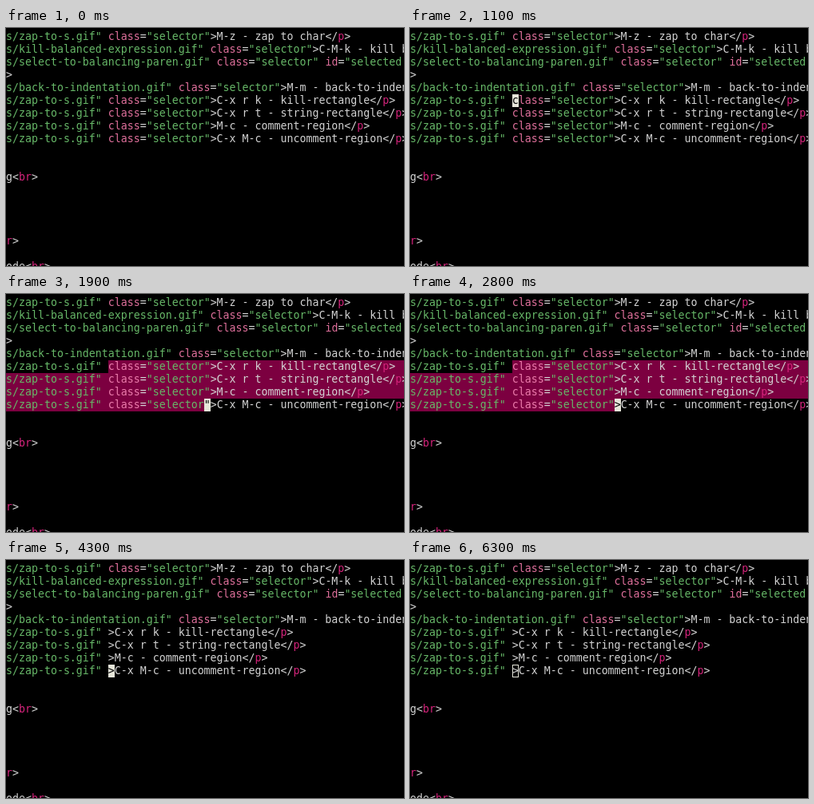
These frames come from a looping animation (498 px wide and 298 px high, 6.4 s). An HTML page:

```html
<!DOCTYPE html>
<html lang="en">
<head>
<meta charset="utf-8">
<title>Kill rectangle</title>
<style>
  html, body { margin: 0; width: 100%; height: 100%; overflow: hidden; background: #000; }
  #editor {
    position: absolute; left: 0; top: 3px; width: 498px; height: 295px; overflow: hidden;
    font: 13.288px/16px "DejaVu Sans Mono", monospace; color: #d3d3d3;
    font-variant-ligatures: none;
  }
  .row { height: 16px; white-space: pre; }
  .row span { display: inline-block; height: 16px; vertical-align: top; }
  .str { color: #67b868; }
  .attr { color: #e0709c; }
  .tag { color: #d6247c; }
  .sel { background: #7c0040; }
  .sel.attr { color: #ec7cac; }
  .row .box { background: #e6e6da; color: #000; }
  .hollow { box-shadow: inset 0 0 0 1px #e6e6da; }
</style>
</head>
<body>
<div id="editor"></div>
<script>
const LOOP = 6400, COLS = 63, TOP = 5, BOTTOM = 8, MARK = 16, END = 32;
const ATTR = 'class="selector"';

const lines = [
  `s/zap-to-s.gif" ${ATTR}>M-z - zap to char</p>`,
  `s/kill-balanced-expression.gif" ${ATTR}>C-M-k - kill balanced`,
  `s/select-to-balancing-paren.gif" ${ATTR} id="selected`,
  '>',
  `s/back-to-indentation.gif" ${ATTR}>M-m - back-to-indentation`,
  `s/zap-to-s.gif" ${ATTR}>C-x r k - kill-rectangle</p>`,
  `s/zap-to-s.gif" ${ATTR}>C-x r t - string-rectangle</p>`,
  `s/zap-to-s.gif" ${ATTR}>M-c - comment-region</p>`,
  `s/zap-to-s.gif" ${ATTR}>C-x M-c - uncomment-region</p>`,
  '', '', 'g<br>', '', '', '', '', 'r>', '', 'ode<br>'
];

// Each step holds until the next: start time, cursor row and column, cursor style, mode.
const steps = [
  { at: 0, row: 5, col: MARK, cursor: '' },
  { at: 600, row: 5, col: MARK, cursor: 'box' },
  { at: 1300, row: 6, col: MARK, cursor: 'box', mode: 'select' },
  { at: 1400, row: 7, col: MARK, cursor: 'box', mode: 'select' },
  { at: 1500, row: 8, col: MARK, cursor: 'box', mode: 'select' },
  { at: 1700, row: 8, col: 21, cursor: 'box', mode: 'select' },
  { at: 1800, row: 8, col: 31, cursor: 'box', mode: 'select' },
  { at: 2400, row: 8, col: END, cursor: 'box', mode: 'select' },
  { at: 2900, row: 8, col: END, cursor: '', mode: 'select' },
  { at: 3400, row: 8, col: END, cursor: 'box', mode: 'select' },
  { at: 4100, row: 8, col: MARK, cursor: 'box', mode: 'killed' },
  { at: 4600, row: 8, col: MARK, cursor: '', mode: 'killed' },
  { at: 5100, row: 8, col: MARK, cursor: 'box', mode: 'killed' },
  { at: 5600, row: 8, col: MARK, cursor: '', mode: 'killed' },
  { at: 6100, row: 8, col: MARK, cursor: 'box', mode: 'killed' },
  { at: 6200, row: 8, col: MARK, cursor: 'hollow', mode: 'killed' }
];

const syntax = [
  ['str', /^s\/[^"]*"|"[^"]*("|$)/g],
  ['attr', /\b(class|id)(?==)/g],
  ['tag', /(?<=<\/?)\w+|^\w+(?=>)/g]
];

function highlight(text) {
  const kinds = Array(COLS).fill('');
  for (const [kind, pattern] of syntax)
    for (const m of text.matchAll(pattern))
      kinds.fill(kind, m.index, m.index + m[0].length);
  return kinds;
}

function drawRow(line, row, step) {
  const killed = step.mode === 'killed' && row >= TOP && row <= BOTTOM;
  const text = killed ? line.slice(0, MARK) + line.slice(END) : line;
  const from = TOP * COLS + MARK, to = step.row * COLS + step.col;
  const classes = highlight(text).map((kind, col) => {
    const pos = row * COLS + col;
    const selected = step.mode === 'select' && pos >= from && pos < to;
    const cursor = pos === to ? step.cursor : '';
    return [kind, selected && 'sel', cursor].filter(Boolean).join(' ');
  });

  const div = document.createElement('div');
  div.className = 'row';
  const cells = text.padEnd(COLS);
  for (let start = 0, col = 1; col <= COLS; col++) {
    if (col < COLS && classes[col] === classes[start]) continue;
    const span = document.createElement('span');
    span.className = classes[start];
    span.textContent = cells.slice(start, col);
    div.append(span);
    start = col;
  }
  return div;
}

const editor = document.getElementById('editor');
const origin = performance.now();
let shown;

function tick() {
  const t = (performance.now() - origin) % LOOP;
  const step = steps.findLast(s => s.at <= t);
  if (step !== shown) {
    editor.replaceChildren(...lines.map((line, row) => drawRow(line, row, step)));
    shown = step;
  }
  requestAnimationFrame(tick);
}
tick();
</script>
</body>
</html>
```
